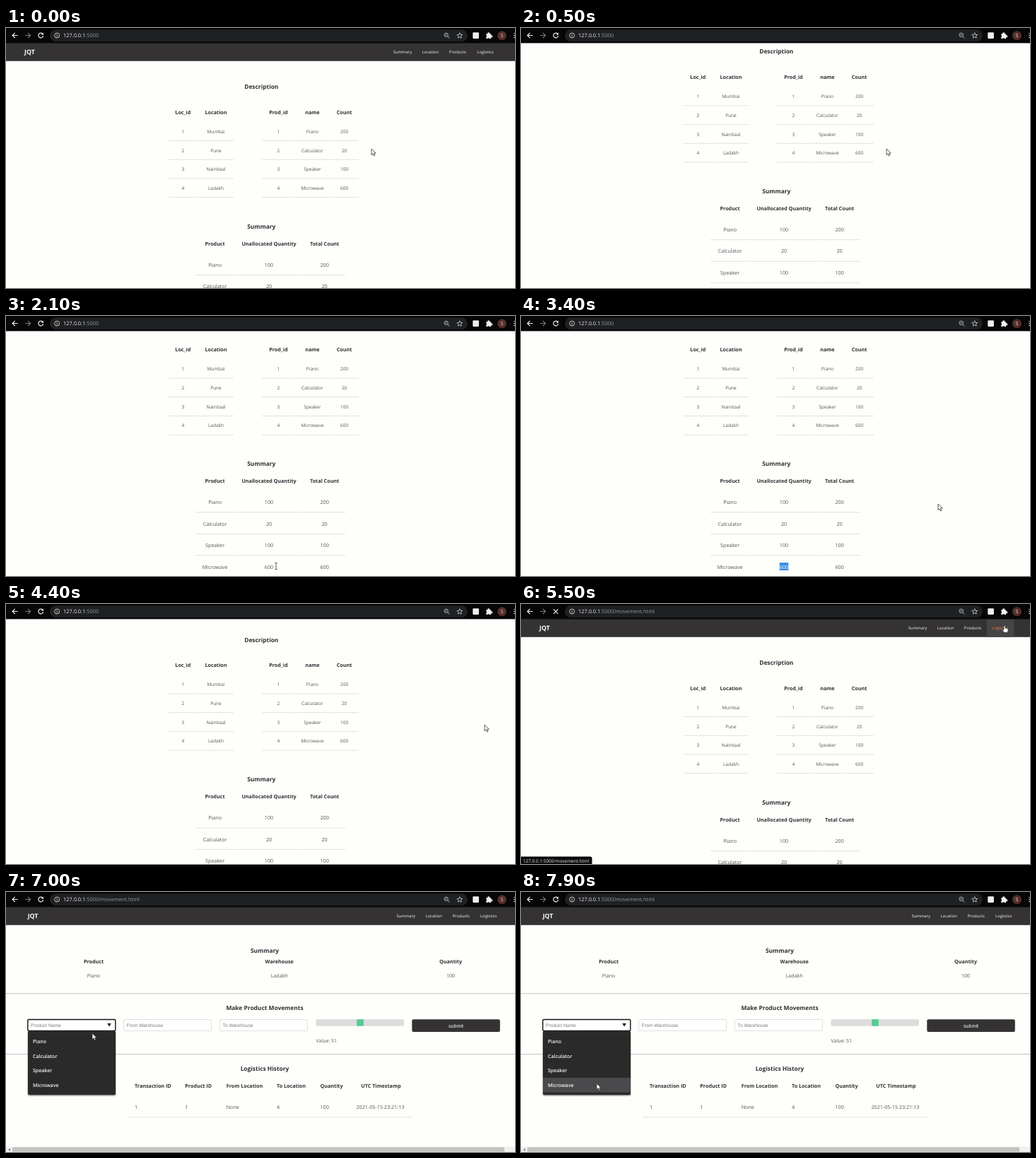
Animation, 720 px wide and 368 px high, one loop 8 s. Source, as an HTML page:

```html
<!DOCTYPE html>
<html lang="en">
<head>
<meta charset="utf-8">
<title>Inventory demo</title>
<style>
html, body { margin: 0; width: 100%; height: 100%; overflow: hidden; background: #fefefb; }
svg { display: block; width: 100vw; height: 100vh; font-family: "Open Sans", "Noto Sans", sans-serif; text-rendering: geometricPrecision; }
.field { font-family: "Liberation Sans", Arial, sans-serif; }
</style>
</head>
<body>
<svg id="stage" viewBox="0 0 720 368"></svg>
<script>
const LOOP = 8000, STEP = 100;
const INK = '#2f3033', CELL = '#55565a', BAR = '#343233', RULE = '#dcdfdb';
const stage = document.getElementById('stage');

function el(parent, tag, attrs = {}, content) {
  const node = document.createElementNS('http://www.w3.org/2000/svg', tag);
  for (const k in attrs) node.setAttribute(k, attrs[k]);
  if (content !== undefined) node.textContent = content;
  parent.append(node);
  return node;
}
const group = (parent, attrs) => el(parent, 'g', attrs);
const rect = (parent, x, y, width, height, fill, extra = {}) =>
  el(parent, 'rect', { x, y, width, height, fill, ...extra });
const path = (parent, d, stroke, extra = {}) =>
  el(parent, 'path', { d, stroke, fill: 'none', 'stroke-width': 1.2, ...extra });
// y is the middle of the capitals
const text = (parent, s, x, y, size, fill, extra = {}) =>
  el(parent, 'text', { x, y: y + size * 0.36, 'font-size': size, fill, 'text-anchor': 'middle', ...extra }, s);
const left = { 'text-anchor': 'start' };
const bold = (parent, s, x, y, size = 7.2, extra = {}) =>
  text(parent, s, x, y, size, INK, { 'font-weight': 700, ...extra });
const show = (node, on) => node.setAttribute('display', on ? 'inline' : 'none');

function rules(parent, edges, y) {
  for (let i = 0; i < edges.length - 1; i++)
    rect(parent, edges[i], y, edges[i + 1] - edges[i] - 1, 0.9, RULE);
}

function table(parent, { heads, xs, headY, rows, firstY, pitch, lineGap, edges, size }) {
  heads.forEach((h, i) => bold(parent, h, xs[i], headY));
  return rows.map((row, r) => {
    const y = firstY + r * pitch;
    rules(parent, edges, y + lineGap);
    return row.map((s, i) => text(parent, s, xs[i], y, size, CELL));
  });
}

function navBar(parent, dx) {
  rect(parent, 0, 21, 720, 25.8, BAR);
  const hover = rect(parent, 659 + dx, 21.5, 38.5, 25.3, '#454446');
  text(parent, 'JQT', 26 + dx, 34.3, 8.8, '#fff', { ...left, 'font-weight': 700 });
  const links = [['Summary', 561], ['Location', 600.5], ['Products', 639], ['Logistics', 678]]
    .map(([s, x]) => text(parent, s, x + dx, 34.3, 5.9, '#f4f4f4'));
  return on => {
    show(hover, on);
    links[3].setAttribute('fill', on ? '#e8844f' : '#f4f4f4');
  };
}

rect(stage, 0, 0, 720, 368, '#fefefb');

// Overview page
const home = group(stage);
const homeNav = navBar(home, 0);
bold(home, 'Description', 361.3, 83, 8.4);
const names = ['Piano', 'Calculator', 'Speaker', 'Microwave'];
const totals = [200, 20, 100, 600], free = [100, 20, 100, 600];
const small = { headY: 119, firstY: 146.5, pitch: 26.7, lineGap: 12.6, size: 6.5 };
table(home, { ...small, heads: ['Loc_id', 'Location'], xs: [250.3, 297], edges: [230, 272, 323],
  rows: ['Mumbai', 'Pune', 'Nainitaal', 'Ladakh'].map((s, i) => [i + 1, s]) });
table(home, { ...small, heads: ['Prod_id', 'name', 'Count'], xs: [385.4, 433.4, 478.6], edges: [362, 410, 458, 500],
  rows: names.map((s, i) => [i + 1, s, totals[i]]) });
bold(home, 'Summary', 361.3, 280.5, 8.4);
const mark = rect(home, 365.7, 420.6, 12.6, 11, '#3a8de0');
const summary = table(home, { heads: ['Product', 'Unallocated Quantity', 'Total Count'], xs: [295.6, 372, 450.6],
  headY: 305, firstY: 335, pitch: 30.5, lineGap: 13.9, size: 7.2, edges: [268, 324, 421, 481],
  rows: names.map((s, i) => [s, free[i], totals[i]]) });
const picked = summary[3][1];

// Movement page
const move = group(stage);
const moveNav = navBar(move, 4.7);
bold(move, 'Summary', 366, 83, 8.4);
[['Product', 'Piano', 124], ['Warehouse', 'Ladakh', 386.7], ['Quantity', '100', 629]].forEach(([h, v, x]) => {
  bold(move, h, x, 98);
  text(move, v, x, 118.5, 7.1, CELL);
});
for (const y of [143.2, 229]) rect(move, 0, y, 720, 1.1, '#c3cac4');
bold(move, 'Make Product Movements', 366, 164, 8.4);
const inputs = [['Product Name', 30.8], ['From Warehouse', 166.6], ['To Warehouse', 302.4]].map(([s, x]) => {
  const box = rect(move, x, 180.5, 124, 16, '#fff', { rx: 1.5, stroke: '#dcdcdc', 'stroke-width': 0.9 });
  text(move, s, x + 4.2, 188.2, 6.7, '#77787a', { ...left, class: 'field' });
  return box;
});
const caret = path(move, 'M143.3 186h5.6l-2.8 4.6z', 'none', { fill: '#111' });
rect(move, 438.3, 180.2, 124.6, 9.5, '#dcdcdc', { rx: 2 });
rect(move, 496.2, 180.2, 9.6, 9.5, '#55cb93');
text(move, 'Value: 51', 438.5, 210.8, 7, CELL, left);
rect(move, 574.3, 180.2, 124.5, 17.8, BAR, { rx: 2 });
text(move, 'submit', 636.5, 189, 7.1, '#fff', { class: 'field' });
bold(move, 'Logistics History', 366, 250, 8.4);
[['Transaction ID', 1, 182], ['Product ID', 1, 253.3], ['From Location', 'None', 311.7], ['To Location', 4, 383],
 ['Quantity', 100, 444.5], ['UTC Timestamp', '2021-05-15 23:21:13', 495.5]].forEach(([h, v, x], i) => {
  bold(move, h, i === 5 ? 502.3 : x, 274.5, 7.2, left);
  text(move, v, x, 304.5, 7.2, CELL, left);
});
rules(move, [172, 244, 302, 373, 435, 486, 576], 318.4);
rect(move, 0, 360.5, 720, 7.5, '#f0f0ef');
rect(move, 9, 361.3, 696, 6.2, '#c1c1c0');
path(move, 'M5.8 362.8v4l-2.4-2z', 'none', { fill: '#666' });

const menu = group(move);
for (const [grow, opacity] of [[2, 0.1], [1, 0.22]])
  rect(menu, 31 - grow / 2, 197, 124 + grow, 90.5 + grow, '#000', { rx: 3, opacity });
rect(menu, 31, 196.6, 124, 90.7, '#2a2a2b', { rx: 2.5 });
const itemTop = i => 201.2 + i * 20.6;
const items = names.map((s, i) => {
  const back = rect(menu, 31, itemTop(i), 124, 20.6, '#4a4a4c');
  text(menu, s, 38, itemTop(i) + 10.4, 7, '#f6f6f6', { ...left, 'font-weight': 600 });
  return back;
});

// Browser toolbar
const chrome = group(stage);
rect(chrome, 0, 0, 720, 21.4, '#060606');
rect(chrome, 62, 2.2, 591, 17, '#1f2022', { rx: 8.5 });
path(chrome, 'M16.5 10.5H9.2m3.5-3.6-3.6 3.6 3.6 3.6', '#f2f2f2');
path(chrome, 'M27.2 10.5h7.3m-3.5-3.6 3.6 3.6-3.6 3.6', '#77797c');
const reload = group(chrome);
path(reload, 'M51.9 8.4a3.4 3.4 0 1 0 .7 2.8', '#f2f2f2');
path(reload, 'M52.9 6.6v3.2h-3.2z', 'none', { fill: '#f2f2f2' });
const stop = path(chrome, 'M46 7.4l6.4 6.4m0-6.4-6.4 6.4', '#f2f2f2');
el(chrome, 'circle', { cx: 72.2, cy: 10.6, r: 3.5, fill: 'none', stroke: '#d5d6d8', 'stroke-width': 0.9 });
path(chrome, 'M72.2 8.5v.9m0 .7v2.6', '#d5d6d8', { 'stroke-width': 0.9 });
const url = text(chrome, '', 81, 10.6, 7.4, '#f1f1f1', left);
el(url, 'tspan', {}, '127.0.0.1');
const urlTail = el(url, 'tspan', { fill: '#96999d' });
el(chrome, 'circle', { cx: 622.7, cy: 9.8, r: 2.7, fill: 'none', stroke: '#c9cacc', 'stroke-width': 0.9 });
path(chrome, 'M624.8 11.9l2.6 2.6M621.4 9.8h2.6', '#c9cacc', { 'stroke-width': 0.9 });
const star = [...Array(10).keys()].map(i => {
  const a = i * Math.PI / 5, r = i % 2 ? 1.8 : 4.1;
  return `${641.8 + r * Math.sin(a)} ${10.8 - r * Math.cos(a)}`;
}).join('L');
path(chrome, `M${star}Z`, '#d5d6d8', { 'stroke-width': 0.8 });
rect(chrome, 660.3, 6.3, 8.6, 8.6, '#f1eeee', { rx: 1 });
path(chrome, 'M679.3 8.2h2a1.5 1.5 0 1 1 2.8 0h2v2.2a1.5 1.5 0 1 1 0 2.6v2h-2.1a1.5 1.5 0 0 0-2.7 0h-2v-2.2a1.5 1.5 0 0 0 0-2.6z',
  'none', { fill: '#f2f2f2' });
el(chrome, 'circle', { cx: 701.5, cy: 10.7, r: 6.4, fill: '#56302a' });
text(chrome, 'S', 701.5, 10.7, 6.6, '#eee');
for (const cy of [7.8, 10.6, 13.4]) el(chrome, 'circle', { cx: 719, cy, r: 0.8, fill: '#ddd' });

const status = group(stage);
path(status, 'M0 357.5H98q2.5 0 2.5 2.5V368H0z', 'none', { fill: '#0b0b0b' });
text(status, '127.0.0.1:5000/movement.html', 3, 363.6, 6.4, '#eee', left);

// Pointers, each with its hot spot at the origin
const outline = { fill: '#fff', 'stroke-width': 0.8, 'stroke-linejoin': 'round' };
const pointers = {
  arrow: path(stage, 'M0 0V8.6L2 6.8 3.4 10 4.9 9.3 3.5 6.2H6.2Z', '#333', outline),
  hand: path(stage, 'M-1-4Q0-6 1.1-4V-1L4.2-.2Q5.4.2 5.2 1.6L4.4 5.4H-.6L-3.2 1.7Q-3.4.2-1 1.3Z', '#222', outline),
  beam: path(stage, 'M-1.5-4.5H1.5M0-4.5V4.5M-1.5 4.5H1.5', '#333', { 'stroke-width': 0.8 })
};

// Keys are [time, value, value...], eased between neighbours
const scrollKeys = [[100, 0], [400, 42], [700, 71.5], [4100, 71.5], [4400, 32.5], [4600, 0]];
const pointerKeys = [[0, 517, 171], [1000, 517, 171], [1800, 384, 353], [2400, 380, 355], [2600, 366, 355],
  [2800, 368, 356], [3300, 590, 266], [3700, 590, 266], [4200, 677, 171], [4600, 677, 171], [5100, 684, 35],
  [5900, 684, 35], [6300, 480, 110], [6700, 122, 189], [6900, 122, 192], [7000, 122, 200], [7300, 121, 203],
  [7800, 107, 271]];

function sample(keys, t) {
  const next = keys.findIndex(k => k[0] > t);
  if (next === 0) return keys[0].slice(1);
  if (next < 0) return keys[keys.length - 1].slice(1);
  const a = keys[next - 1], b = keys[next];
  const u = (t - a[0]) / (b[0] - a[0]), e = u * u * (3 - 2 * u);
  return a.slice(1).map((v, i) => v + (b[i + 1] - v) * e);
}

function render(t) {
  const [scroll] = sample(scrollKeys, t), [x, y] = sample(pointerKeys, t);
  const loaded = t >= 5800, loading = t >= 5400 && !loaded, open = t >= 6800;
  home.setAttribute('transform', `translate(0 ${-scroll})`);
  show(home, !loaded);
  show(move, loaded);

  const overLink = x > 659 && x < 702 && y > 22 && y < 47 - scroll;
  homeNav(overLink);
  moveNav(overLink);
  show(status, overLink);
  show(stop, loading);
  show(reload, !loading);
  urlTail.textContent = t >= 5400 ? ':5000/movement.html' : ':5000';

  const selected = t >= 2600 && t < 3900;
  show(mark, selected);
  picked.setAttribute('fill', selected ? '#fff' : CELL);

  const overField = loaded && x > 31 && x < 155 && y > 180 && y < 197;
  show(menu, open);
  show(caret, open || overField);
  inputs[0].setAttribute('stroke', open ? '#111' : '#dcdcdc');
  inputs[0].setAttribute('stroke-width', open ? 1.4 : 0.9);
  items.forEach((item, i) => show(item, y >= itemTop(i) + 1 && y < itemTop(i + 1) + 1));

  const overText = t >= 1800 && t <= 2800;
  const kind = overLink ? 'hand' : overText || overField ? 'beam' : 'arrow';
  for (const name in pointers) {
    show(pointers[name], name === kind);
    pointers[name].setAttribute('transform', `translate(${x} ${y})`);
  }
}

const start = performance.now();
function tick() {
  const t = (performance.now() - start) % LOOP;
  render(Math.floor(t / STEP) * STEP);
  requestAnimationFrame(tick);
}
tick();
</script>
</body>
</html>
```
